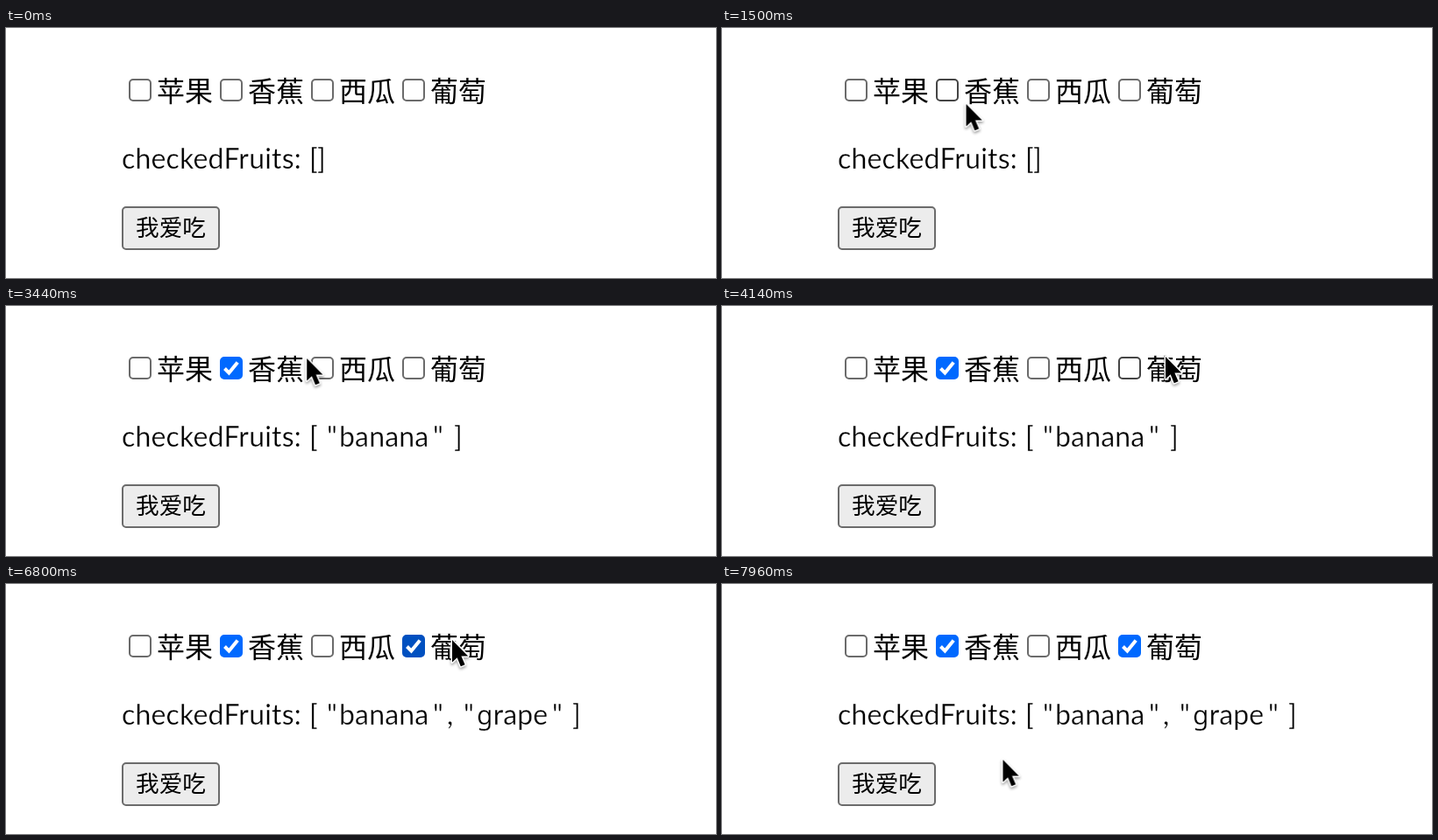
Animation, 810 px wide and 286 px high, one loop 8000 ms. Source, as an HTML page:

```html
<!DOCTYPE html>
<html lang="zh-CN">
<head>
<meta charset="utf-8">
<title>Fruit checkboxes</title>
<style>
  html, body { margin: 0; width: 100%; height: 100%; overflow: hidden; background: #fff; }
  svg { display: block; }
  text { fill: #000; white-space: pre; }
  .cjk { font: 32px "Noto Sans CJK SC", "Noto Sans CJK", sans-serif; }
  /* The white outline makes the strokes a little lighter. */
  .latin { font: 32px Lato, sans-serif; letter-spacing: .17px; stroke: #fff; stroke-width: .4px; }
  .cjk.small { font-size: 26.67px; }
  .round-g { font: 30px "Noto Sans", sans-serif; }
  .cursor { filter: drop-shadow(0 2px 1.5px rgba(0, 0, 0, .35)); }
</style>
</head>
<body>
<svg id="stage" width="810" height="286" viewBox="0 0 810 286"></svg>
<script>
const LOOP = 8000;
const stage = document.getElementById('stage');

function add(parent, tag, attrs = {}, text = '') {
  const el = document.createElementNS('http://www.w3.org/2000/svg', tag);
  for (const [key, value] of Object.entries(attrs)) el.setAttribute(key, value);
  el.textContent = text;
  parent.append(el);
  return el;
}

function play(el, frames) {
  const last = frames[frames.length - 1];
  el.animate([...frames, { ...last, offset: 1 }], { duration: LOOP, iterations: Infinity });
}

// Hard changes: steps are [time, style] pairs.
function hold(el, steps) {
  play(el, steps.map(([time, style]) => ({ offset: time / LOOP, easing: 'step-end', ...style })));
}

function show(el, from, to = LOOP) {
  const steps = [[0, { opacity: from === 0 ? 1 : 0 }]];
  if (from > 0) steps.push([from, { opacity: 1 }]);
  if (to < LOOP) steps.push([to, { opacity: 0 }]);
  hold(el, steps);
}

// Checkboxes
const COLORS = {
  idle: ['#fff', '#6b6b6b'], hover: ['#fff', '#454545'], press: ['#fff', '#838383'],
  checked: ['#0069ff', '#0069ff'], checkedHover: ['#0050c0', '#0050c0'],
};
const fruits = [
  { label: '苹果', states: [[0, 'idle']] },
  { label: '香蕉', checkedAt: 2740, states: [[0, 'idle'], [1460, 'hover'], [2500, 'press'],
    [2740, 'checkedHover'], [3420, 'checked']] },
  { label: '西瓜', states: [[0, 'idle'], [3480, 'hover'], [3840, 'idle']] },
  { label: '葡萄', checkedAt: 5980, states: [[0, 'idle'], [3860, 'hover'], [5700, 'press'],
    [5980, 'checkedHover'], [7180, 'checked']] },
];
fruits.forEach(({ label, checkedAt, states }, i) => {
  const item = add(stage, 'g', { transform: `translate(${140 + 104 * i} 58)` });
  const box = add(item, 'rect', { x: 1, y: 1, width: 24, height: 24, rx: 4, 'stroke-width': 2 });
  hold(box, states.map(([time, name]) => {
    const [fill, stroke] = COLORS[name];
    return [time, { fill, stroke }];
  }));
  if (checkedAt) {
    show(add(item, 'path', { d: 'M5.5 13.5 10.4 18.6 20.2 6.6', fill: 'none', stroke: '#fff', 'stroke-width': 4 }), checkedAt);
  }
  add(item, 'text', { class: 'cjk', x: 32, y: 26 }, label);
});

// Value line: words are [text, x] pairs.
function line(words) {
  const group = add(stage, 'g', { class: 'latin' });
  for (const [word, x] of words) add(group, 'text', { x, y: 161 }, word);
  return group;
}
line([['checkedFruits:', 132], ['[', 346]]);
show(line([[']', 355]]), 0, 2740);
show(line([['"', 366], ['banana', 380], ['"', 487]]), 2740);
show(line([[']', 511]]), 2740, 5980);
const grape = line([[',', 503], ['"', 522], ['"', 623], [']', 646]]);
const word = add(grape, 'text', { x: 537, y: 161 });
add(word, 'tspan', { class: 'round-g' }, 'g');
add(word, 'tspan', {}, 'rape');
show(grape, 5980);

// Button
add(stage, 'rect', { x: 133, y: 205, width: 110, height: 48, rx: 4, fill: '#ececec', stroke: '#6b6b6b', 'stroke-width': 2 });
add(stage, 'text', { class: 'cjk small', x: 148, y: 238 }, '我爱吃');

// Pointer: [time, x, y, easing to the next point]
const path = [
  [0, 840, 147, 'step-end'], [20, 796, 147, 'cubic-bezier(.2,.5,.5,1)'], [500, 254, 113, 'ease-in-out'],
  [680, 275, 99], [780, 275, 99], [800, 276, 99], [1100, 276, 99, 'ease-in-out'],
  [1900, 281, 75], [2080, 288, 68], [2920, 288, 68, 'ease-in'],
  [3440, 343, 60], [3720, 404, 60, 'ease-out'], [4140, 506, 58],
  [4260, 506, 58], [4280, 507, 58], [4400, 507, 58], [4460, 511, 59],
  [4700, 511, 59], [4720, 512, 61], [4840, 512, 61], [5000, 509, 65],
  [6780, 509, 65], [6800, 509, 64], [6920, 509, 64, 'ease-in-out'],
  [7680, 422, 128], [7760, 422, 128, 'ease-out'], [7960, 320.5, 201],
];
const cursor = add(stage, 'g', { class: 'cursor' });
add(cursor, 'path', {
  d: 'M0 0V25.5L5.7 20.2 9.8 30.2 14.6 28.2 10.4 18.4H18.2Z',
  fill: '#000', stroke: '#fff', 'stroke-width': 3, 'stroke-linejoin': 'round', 'paint-order': 'stroke',
});
play(cursor, path.map(([time, x, y, easing = 'linear']) => (
  { offset: time / LOOP, transform: `translate(${x}px, ${y}px)`, easing }
)));
</script>
</body>
</html>
```
